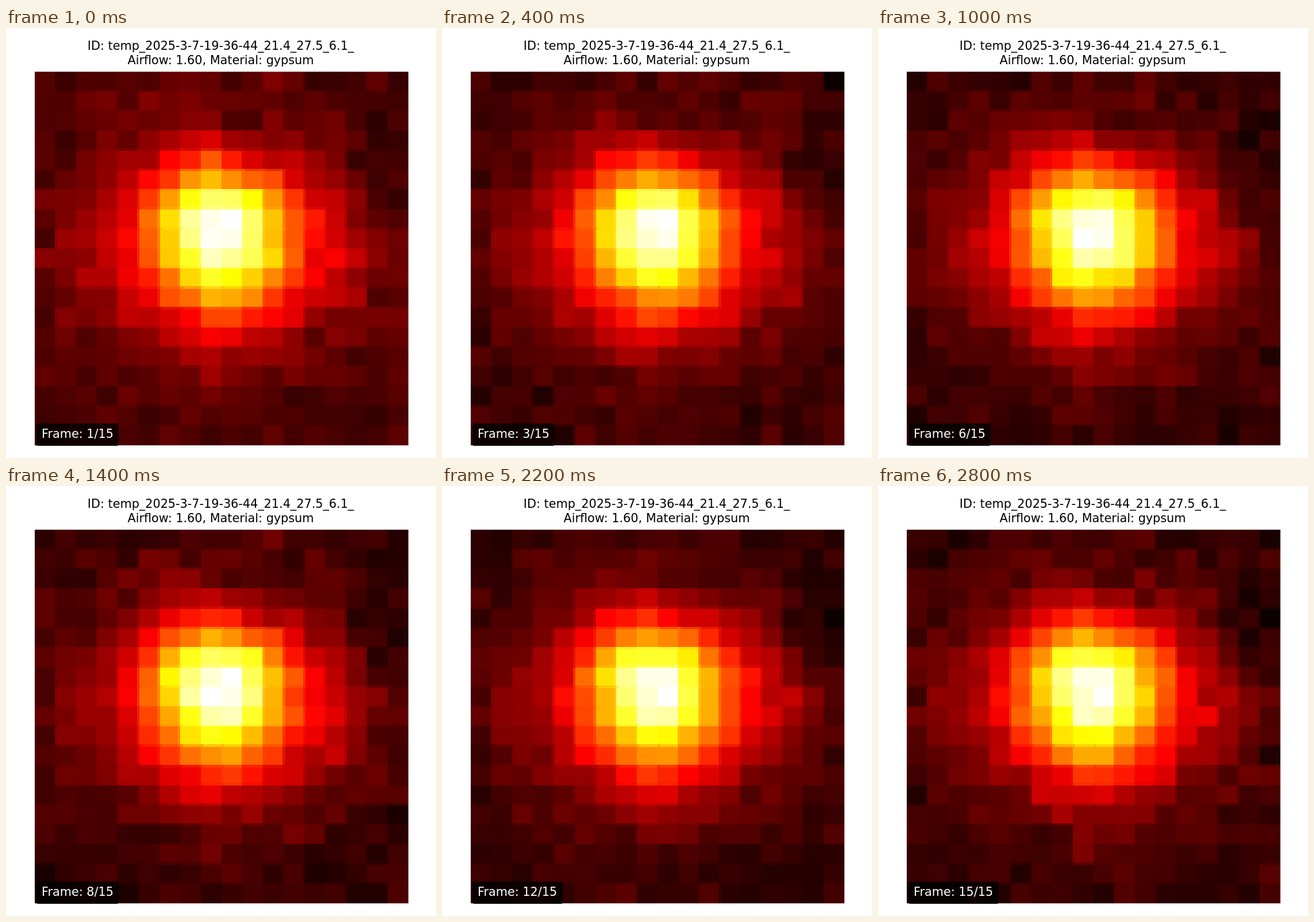
An HTML page with a canvas that plays this animation: 748x748 px, repeating every 3000 ms.

```html
<!DOCTYPE html>
<html lang="en">
<head>
<meta charset="utf-8">
<title>Thermal sequence</title>
<style>
  html, body { margin: 0; width: 100%; height: 100%; overflow: hidden; background: #fff; }
  canvas, svg { position: absolute; left: 0; top: 0; }
  text { font: 20.78px "DejaVu Sans", sans-serif; }
</style>
</head>
<body>
<canvas id="stage" width="748" height="748"></canvas>
<svg width="748" height="748" viewBox="0 0 748 748">
  <text x="141.8" y="38">ID: temp_2025-3-7-19-36-44_21.4_27.5_6.1_</text>
  <text x="211.5" y="63">Airflow: 1.60, Material: gypsum</text>
  <rect id="box" x="53" y="688" width="143" height="39" rx="3" fill-opacity=".8"/>
  <text id="label" x="62" y="713" fill="#fff"></text>
</svg>
<script>
const COLS = 18, ROWS = 19, SIZE = 146, FRAMES = 15, STEP = 200;
const stage = document.getElementById('stage').getContext('2d');
const heat = Object.assign(document.createElement('canvas'), { width: SIZE, height: SIZE }).getContext('2d');
const box = document.getElementById('box');
const label = document.getElementById('label');
stage.imageSmoothingEnabled = false;

const clamp = v => Math.min(1, Math.max(0, v));
const bump = (dx, dy, width, height = width) => Math.exp(-((dx / width) ** 2) - (dy / height) ** 2);

// Seeded generator of bell-shaped noise around zero.
function grain(seed) {
  const uniform = () => {
    seed = seed + 0x6D2B79F5 | 0;
    let t = Math.imul(seed ^ seed >>> 15, 1 | seed);
    t = t + Math.imul(t ^ t >>> 7, 61 | t) ^ t;
    return ((t ^ t >>> 14) >>> 0) / 4294967296;
  };
  return () => uniform() + uniform() + uniform() - 1.5;
}

// Hot core, wide glow, warm flanks, and cooler air above and at the upper right.
function field(col, row) {
  const dx = col - 8.4, dy = row - 7.55;
  return .055
    + .075 * bump(dx, dy, 7.5)
    + .85 * bump(dx, dy, 3.7, dy < 0 ? 3.6 : 4.55)
    + .11 * bump(col - 14.1, row - 9, 2.4, 3.6)
    + .07 * bump(col - 2.1, row - 8.6, 2.4, 3.2)
    - .07 * bump(col - 9.7, row - 3.2, 1.6, 1.9)
    - .05 * bump(col - 16.2, row - 3.6, 1.1, 3);
}

const fixedGrain = grain(7);
const mean = Array.from({ length: COLS * ROWS }, (_, i) =>
  field(i % COLS, Math.floor(i / COLS)) + .03 * fixedGrain());

// Black, red, yellow, white ramp.
function hot(v) {
  const channels = [.0416 + .9584 * v / .365, (v - .365) / .381, (v - .746) / .254];
  return `rgb(${channels.map(c => Math.round(255 * clamp(c))).join()})`;
}

function draw(frame) {
  const noise = grain(frame * 977 + 31);
  const warm = .03 * Math.exp(-frame / 1.5);
  const values = mean.map(v => v + warm * (1 - v) + .036 * noise());
  const low = Math.min(...values, 0), high = Math.max(...values);
  const w = SIZE / COLS, h = SIZE / ROWS;
  values.forEach((v, i) => {
    heat.fillStyle = hot((v - low) / (high - low));
    // Overlap onto the next cells so that shared edge pixels blend.
    heat.fillRect(i % COLS * w, Math.floor(i / COLS) * h, w + 1, h + 1);
  });
  stage.clearRect(0, 0, 748, 748);
  stage.drawImage(heat.canvas, 49.5, 75.5, 650, 650);
  label.textContent = `Frame: ${frame + 1}/${FRAMES}`;
  box.setAttribute('width', frame < 9 ? 143 : 157);
}

const start = performance.now();
let shown = -1;
function tick() {
  const frame = Math.floor((performance.now() - start) / STEP) % FRAMES;
  if (frame !== shown) draw(shown = frame);
  requestAnimationFrame(tick);
}
tick();
</script>
</body>
</html>
```
